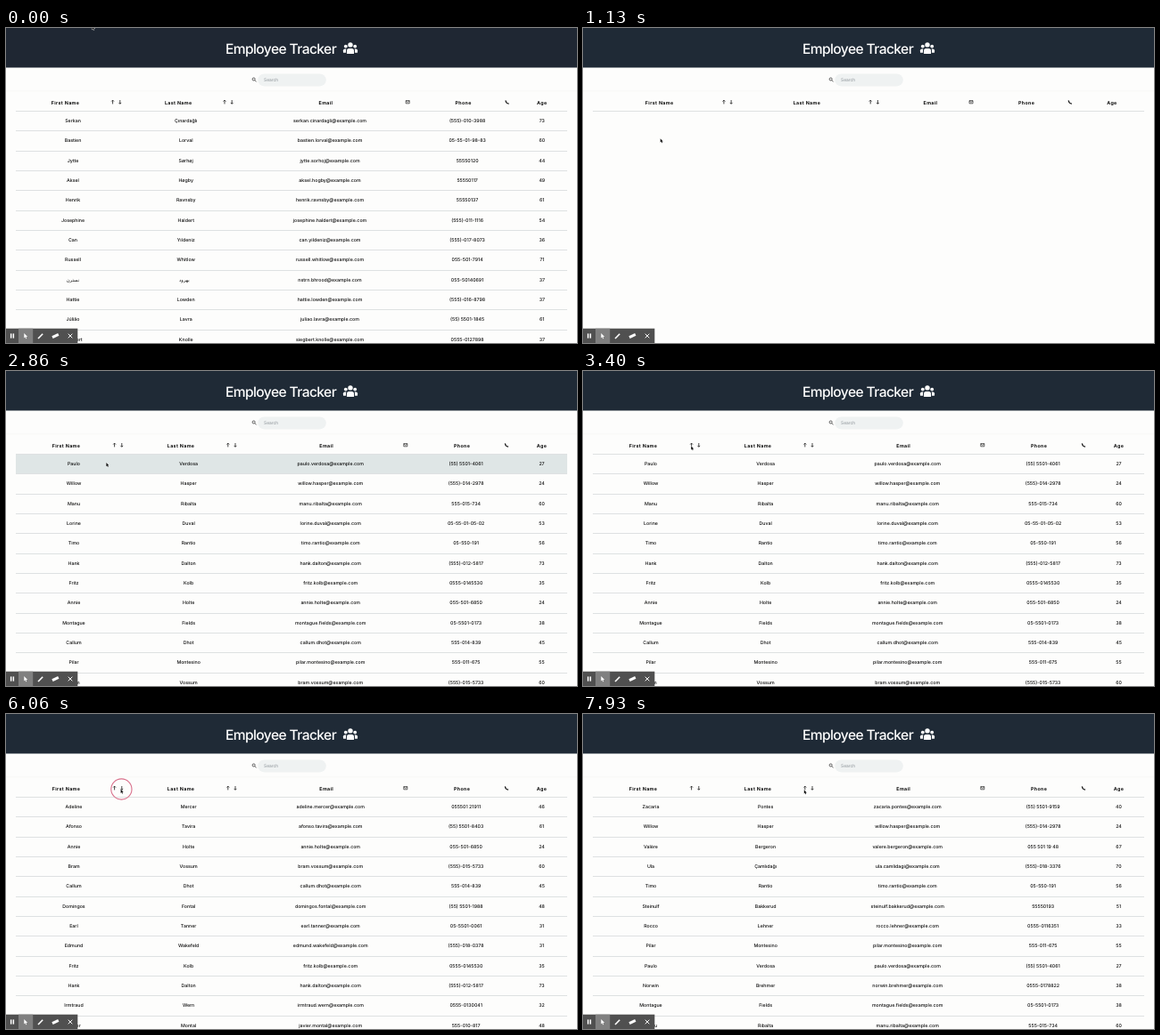
Recreate the animation shown at these times as an HTML page with a canvas. Size 640 by 354 pixels, loop 8000 ms.

```html
<!DOCTYPE html>
<html lang="en">
<head>
<meta charset="utf-8">
<title>Employee Tracker</title>
<style>
html, body { margin: 0; width: 100%; height: 100%; overflow: hidden; background: #fdfdfc; }
canvas { display: block; width: 640px; height: 354px; }
</style>
</head>
<body>
<canvas id="stage"></canvas>
<script>
const W = 640, H = 354, LOOP = 8000;
const LEFT = 11, RIGHT = 629, ROW_TOP = 93.4, ROW_H = 22.33;
const SANS = 'Inter, "DejaVu Sans", sans-serif';

const canvas = document.getElementById('stage');
const ctx = canvas.getContext('2d');
const ratio = window.devicePixelRatio || 1;
canvas.width = W * ratio;
canvas.height = H * ratio;

// Phone patterns by country; every # becomes a seeded digit.
const phones = {
  us: '(555)-01#-####', br: '(55) 5501-####', fr: '05-55-01-##-##', es: '555-01#-###',
  fi: '05-550-1##', de: '0555-01#####', ie: '055-501-####', dk: '555501##',
  au: '05-5501-####', ir: '055-5014####', uk: '055501 #####', ch: '055 501 ## ##'
};

let seed = 41;
function random() {
  seed = (seed * 16807) % 2147483647;
  return seed / 2147483647;
}

function mailName(text) {
  return text.toLowerCase().normalize('NFD').replace(/[\u0300-\u036f]/g, '')
    .replace(/ı/g, 'i').replace(/ø/g, 'o');
}

function people(list) {
  return list.split(',').map(item => {
    const [first, last, country, user] = item.trim().split(' ');
    return {
      first, last,
      email: (user || mailName(first + '.' + last)) + '@example.com',
      phone: phones[country].replace(/#/g, () => Math.floor(random() * 10)),
      age: String(23 + Math.floor(random() * 52))
    };
  });
}

const firstBatch = people(`Serkan Çınardağlı us, Bastien Lorval fr, Jytte Sørhøj dk,
  Aksel Høgby dk, Henrik Ravnsby dk, Josephine Haldert us, Can Yıldeniz us,
  Russell Whitlow ie, نسترن بهرود ir nstrn.bhrood, Hattie Lowden us,
  Júlião Lavra br, Siegbert Knolle de`);

const loaded = people(`Paulo Verdosa br, Willow Hasper us, Manu Ribalta es,
  Lorine Duval fr, Timo Rantio fi, Hank Dalton us, Fritz Kolb de, Annie Holte ie,
  Montague Fields au, Callum Dhot es, Pilar Montesino es, Bram Vossum us,
  Adeline Mercer uk, Afonso Tavira br, Domingos Fontal br, Earl Tanner au,
  Edmund Wakefeld us, Irmtraud Wern de, Javier Montal es, Zacaria Pontes br,
  Valère Bergeron ch, Ula Çamlıdağı us, Steinulf Bakkerud dk, Rocco Lehner de,
  Norwin Brehmer de`);

const ascending = [...loaded].sort((a, b) => a.first < b.first ? -1 : 1);
const descending = [...ascending].reverse();

// Inner column borders; all centres and icons follow from them.
const startCols = [139, 264.4, 461.6, 572.6];
const emptyCols = [177.3, 341.6, 446.4, 556.8];
const fullCols = [141, 268.2, 459.2, 572];

const columns = [
  { name: 'First Name', field: 'first', shift: 8.5, icon: 'sort' },
  { name: 'Last Name', field: 'last', shift: 8.5, icon: 'sort' },
  { name: 'Email', field: 'email', shift: 4.5, icon: 'mail' },
  { name: 'Phone', field: 'phone', shift: 4.5, icon: 'phone' },
  { name: 'Age', field: 'age', shift: 0 }
];

// Pointer moves: begin, end, x, y.
const moves = [
  [460, 460, -20, -20], [730, 730, 72, 106], [730, 1000, 86.7, 124.2],
  [1460, 1530, 88.2, 125.8], [2730, 2860, 112.4, 103], [2860, 3460, 121.3, 84],
  [5260, 5400, 125, 84.2], [5600, 5860, 128.6, 84.6], [7260, 7930, 247.8, 85.3]
];

function pointerAt(t) {
  let x = 96.4, y = -2.6;
  for (const [begin, end, toX, toY] of moves) {
    if (t < begin) break;
    const u = t >= end ? 1 : (t - begin) / (end - begin);
    const ease = u * (2 - u);
    x += (toX - x) * ease;
    y += (toY - y) * ease;
  }
  return [x, y];
}

function rect(x, y, w, h, color) {
  ctx.fillStyle = color;
  ctx.fillRect(x, y, w, h);
}

function pill(x, y, w, h, r, color) {
  ctx.fillStyle = color;
  ctx.beginPath();
  ctx.roundRect(x, y, w, h, r);
  ctx.fill();
}

function ring(x, y, r, color, width) {
  ctx.strokeStyle = color;
  ctx.lineWidth = width;
  ctx.beginPath();
  ctx.arc(x, y, r, 0, Math.PI * 2);
  ctx.stroke();
}

function line(d, x, y, color, width, flip = 1) {
  ctx.save();
  ctx.translate(x, y);
  ctx.scale(1, flip);
  ctx.strokeStyle = color;
  ctx.lineWidth = width;
  ctx.stroke(new Path2D(d));
  ctx.restore();
}

function label(text, x, y, { size = 5.25, weight = 500, color = '#0c0c0c', spacing = 0, align = 'center' } = {}) {
  ctx.font = `${weight} ${size}px ${SANS}`;
  ctx.textRendering = 'geometricPrecision';
  ctx.letterSpacing = spacing + 'px';
  ctx.textAlign = align;
  ctx.fillStyle = color;
  ctx.fillText(text, x, y);
}

function person(x, y, size) {
  pill(x - size, y - size, size * 2, size * 2, size, '#fff');
  pill(x - size * 1.5, y + size * 1.5, size * 3, size * 2.2, [size, size, 0.5, 0.5], '#fff');
}

function drawBanner(t) {
  const back = t < 1000 ? '#1f2733' : '#1f2a36';
  rect(0, 0, W, 44.5, back);
  label('Employee Tracker', 308, 28.5, { size: 15.6, color: '#fff', spacing: -0.6 });
  person(380.8, 20.6, 1.9);
  person(391.2, 20.6, 1.9);
  pill(381, 22, 10, 8, 3, back);
  person(386, 18.9, 2.7);
}

function drawSearch() {
  pill(282.3, 51.4, 76.5, 14, 7, '#eff2f2');
  label('Search', 289, 60.1, { size: 4.9, weight: 400, color: '#8b9297', align: 'left' });
  ring(277.7, 57.5, 1.5, '#333', 0.8);
  line('M0 0L1.8 1.8', 278.8, 58.6, '#333', 0.8);
  rect(0, 70.6, W, 0.6, '#f2f2f1');
}

function drawIcon(kind, edge) {
  const y = 83.2, ink = '#1a1a1a';
  if (kind === 'sort') {
    const arrow = 'M0 2.2V-2M-1.4 -0.7L0 -2.1L1.4 -0.7';
    line(arrow, edge - 19.4, y, ink, 0.8);
    line(arrow, edge - 11.2, y, ink, 0.8, -1);
  } else if (kind === 'mail') {
    line('M-2 -1.6H2V1.6H-2ZM-2 -1.3L0 0.2L2 -1.3', edge - 11.4, y, ink, 0.65);
  } else if (kind === 'phone') {
    line('M-1.9 -1.9Q-1.4 1.4 1.9 1.9', edge - 10.8, y, ink, 1.1);
  }
}

function drawTable(borders, rows, hover) {
  const edges = [LEFT, ...borders, RIGHT];
  if (hover >= 0) rect(LEFT, ROW_TOP + hover * ROW_H, RIGHT - LEFT, ROW_H, '#dfe6e6');
  const count = Math.max(1, Math.min(rows.length, 12));
  for (let i = 0; i < count; i++) {
    rect(LEFT, Math.floor(ROW_TOP + i * ROW_H), RIGHT - LEFT, 1, '#dee1e2');
  }
  columns.forEach(({ name, field, shift, icon }, c) => {
    const middle = (edges[c] + edges[c + 1]) / 2;
    label(name, middle - shift, 86.4, { size: 5.3, weight: 700, spacing: 0.36 });
    drawIcon(icon, edges[c + 1]);
    rows.slice(0, 12).forEach((row, i) => label(row[field], middle, ROW_TOP + i * ROW_H + 12.6));
  });
}

function drawToolbar() {
  rect(0, 337.7, 80.3, 17, '#505050');
  rect(14, 337.7, 16.2, 17, '#808080');
  rect(4.9, 343.4, 1.5, 5.2, '#fff');
  rect(7.6, 343.4, 1.5, 5.2, '#fff');
  drawArrow(20.3, 343, 1, '#fff');
  line('M-3 3L2.2 -2.2', 39, 346, '#fff', 1.6);
  line('M-3.4 1.6L3.4 -1.6', 55.4, 346, '#fff', 3);
  line('M-2.3 -2.3L2.3 2.3M2.3 -2.3L-2.3 2.3', 72, 346, '#fff', 1);
}

function drawArrow(x, y, scale, fill, edge) {
  const shape = new Path2D('M0 0V5.4L1.2 4.3L2 6.3L2.9 5.9L2.1 4H3.8Z');
  ctx.save();
  ctx.translate(x, y);
  ctx.scale(scale, scale);
  if (edge) {
    ctx.strokeStyle = edge;
    ctx.lineWidth = 0.8;
    ctx.stroke(shape);
  }
  ctx.fillStyle = fill;
  ctx.fill(shape);
  ctx.restore();
}

function drawPage(t, pointerY) {
  drawBanner(t);
  drawSearch();
  if (t < 1000) return drawTable(startCols, firstBatch, -1);
  if (t < 1730) return drawTable(emptyCols, [], -1);
  const rows = t < 4060 ? loaded : t < 6200 ? ascending : descending;
  const hover = t < 1800 ? -1 : Math.floor((pointerY - ROW_TOP) / ROW_H);
  drawTable(fullCols, rows, hover);
}

function draw(t) {
  const [x, y] = pointerAt(t);
  ctx.setTransform(ratio, 0, 0, ratio, 0, 0);
  rect(0, 0, W, H, '#fdfdfc');
  drawPage(t, y);
  drawToolbar();
  const clicking = (t >= 3860 && t < 4060) || (t >= 6060 && t < 6200);
  if (clicking) ring(x + 0.8, 84.5, 11.6, '#d9718c', 1.1);
  drawArrow(x, y, 0.8, '#111', '#fff');
}

function snap(t) {
  const tick = Math.floor((t + 6.7) * 15 / 1000);
  return Math.floor(tick * 100 / 15 + 1e-6) * 10;
}

const start = performance.now();
function frame() {
  draw(snap((performance.now() - start) % LOOP));
  requestAnimationFrame(frame);
}
frame();
</script>
</body>
</html>
```
